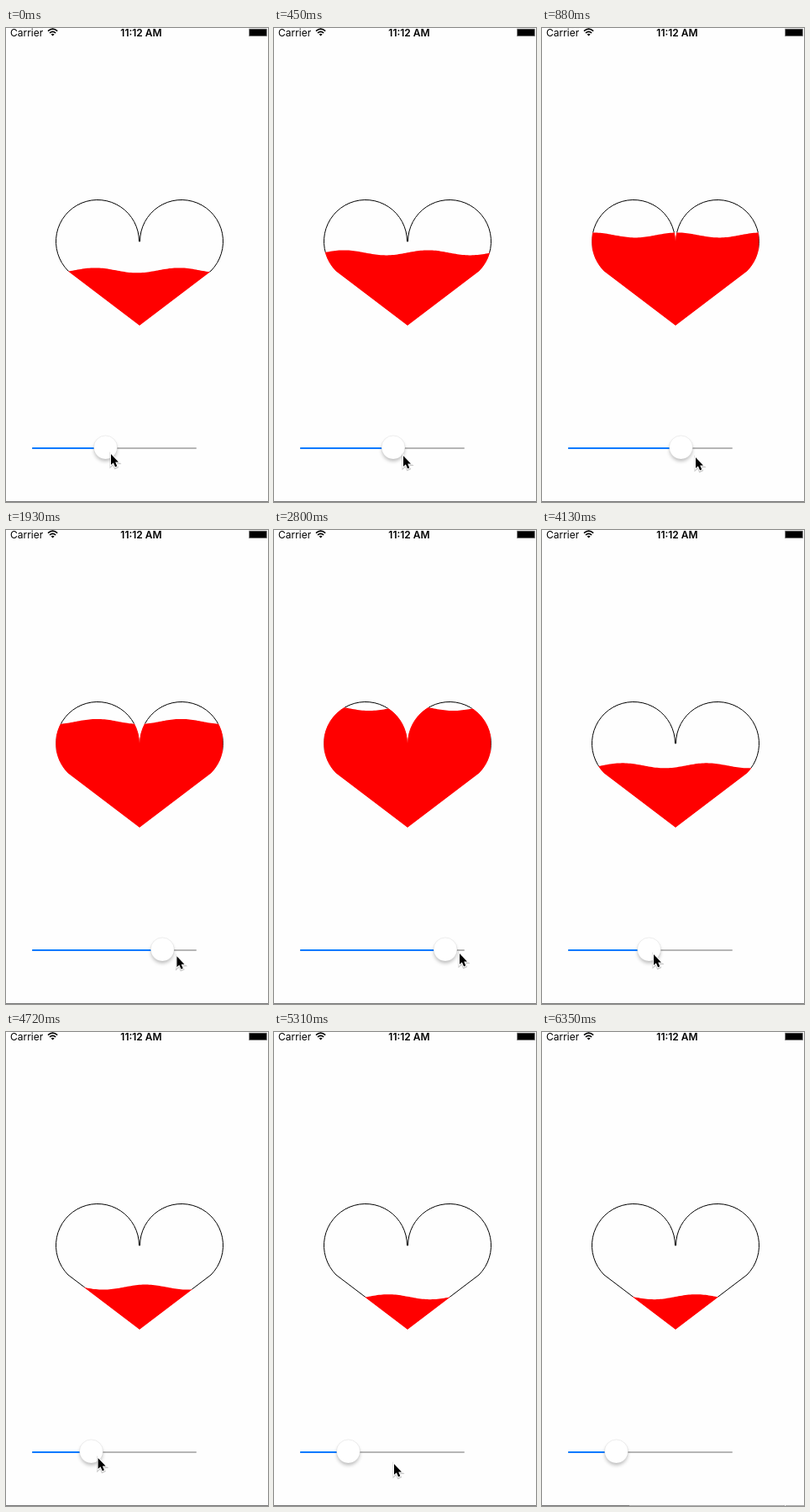
Recreate the animation shown at these times as an HTML page. Size 312 by 564 pixels, loop 6.43 s.

```html
<!DOCTYPE html>
<html lang="en">
<head>
<meta charset="utf-8">
<title>Heart level</title>
<style>
  html, body { margin: 0; width: 100%; height: 100%; overflow: hidden; background: #fefefe; }
  svg { display: block; width: 312px; height: 564px; }
  text { font: 12px Inter, Roboto, sans-serif; fill: #000; }
  .clock { font-weight: 600; text-anchor: middle; }
</style>
</head>
<body>
<svg viewBox="0 0 312 564">
  <defs>
    <path id="heart" d="M158.5 254A49.5 49.5 0 1 0 74 289L159 353.5L244 289A49.5 49.5 0 1 0 159.5 254Z"/>
    <clipPath id="liquid"><path id="wave"/></clipPath>
    <clipPath id="air"><path id="rest" clip-rule="evenodd"/></clipPath>
    <filter id="soft" x="-50%" y="-50%" width="200%" height="200%">
      <feGaussianBlur stdDeviation="2"/>
    </filter>
    <path id="arrow" d="M0 0V12.8L2.9 10.2L5.1 15.2L7.3 14.3L5.2 9.4H9Z"/>
  </defs>

  <text x="5" y="10">Carrier</text>
  <g fill="none" stroke="#000" stroke-width="1.6">
    <path d="M50 3.6Q55.6 -1.4 61.2 3.6M52 6Q55.6 2.6 59.2 6"/>
    <path d="M55.6 9.6L53.6 7.6Q55.6 6 57.6 7.6Z" fill="#000" stroke="none"/>
  </g>
  <text class="clock" x="161" y="10">11:12 AM</text>
  <rect x="289.6" y="1.1" width="21" height="8.6" fill="#000" stroke="#888" stroke-width=".6"/>

  <use href="#heart" fill="none" stroke="#000" clip-path="url(#air)"/>
  <use href="#heart" fill="#f00" stroke="#f00" clip-path="url(#liquid)"/>

  <rect x="31" y="499" width="196" height="2" rx="1" fill="#b6b6b6"/>
  <rect id="track" x="31" y="499" height="2" rx="1" fill="#007aff"/>
  <g id="knob">
    <circle cy="3" r="13.5" fill="#000" opacity=".25" filter="url(#soft)"/>
    <circle r="14" fill="#fff" stroke="#000" stroke-opacity=".12" stroke-width=".6"/>
  </g>

  <rect y="563" width="312" height="1" fill="#777"/>
  <rect id="edge" x="104" y="563" width="208" height="1" fill="#aaa"/>
  <g id="pointer">
    <use href="#arrow" y="1" stroke="#000" stroke-width="3" opacity=".2"/>
    <use href="#arrow" stroke="#fff" stroke-width="2"/>
    <use href="#arrow"/>
  </g>
</svg>
<script>
  const LOOP = 6430, STEP = 147.6;
  const $ = id => document.getElementById(id);

  // Drag the knob up, back down, let go and leave: step, knob x, pointer x, pointer y
  const drag = [
    [0, 118.5, 125, 507], [6, 165.5, 183, 511], [19, 204, 221, 504],
    [24, 167.5, 179, 500], [28, 127.5, 133, 505], [34, 88.5, 98, 508],
    [36, 88.5, 143, 514], [41, 88.5, 290, 565]
  ];

  function pose(n) {
    const i = drag.findIndex(key => key[0] > n);
    if (i < 0) return drag[drag.length - 1];
    const a = drag[i - 1], b = drag[i];
    const p = (n - a[0]) / (b[0] - a[0]);
    return a.map((v, k) => v + (b[k] - v) * p);
  }

  function wavePath(level, peak) {
    const left = 59.4, right = 258.2;
    let d = `M${left} 360`;
    for (let i = 0; i <= 100; i++) {
      const x = left + (right - left) * i / 100;
      const y = level - 3 * Math.cos((x - peak) * Math.PI / 50);
      d += `L${x.toFixed(2)} ${y.toFixed(2)}`;
    }
    return d + `L${right} 360Z`;
  }

  function draw(ms) {
    const n = Math.floor((ms + 10) / STEP);
    const [, knob, px, py] = pose(n);
    const level = 354 - 150 * (knob - 45) / 168;
    const wave = wavePath(level, 106 - 7.5 * n);
    $('wave').setAttribute('d', wave);
    $('rest').setAttribute('d', 'M0 0H312V564H0Z' + wave);
    $('track').setAttribute('width', knob - 31);
    $('knob').setAttribute('transform', `translate(${knob} 499)`);
    $('pointer').setAttribute('transform', `translate(${px} ${py})`);
    $('edge').setAttribute('visibility', n > 41 ? 'visible' : 'hidden');
  }

  const start = performance.now();
  function tick() {
    draw((performance.now() - start) % LOOP);
    requestAnimationFrame(tick);
  }
  tick();
</script>
</body>
</html>
```
